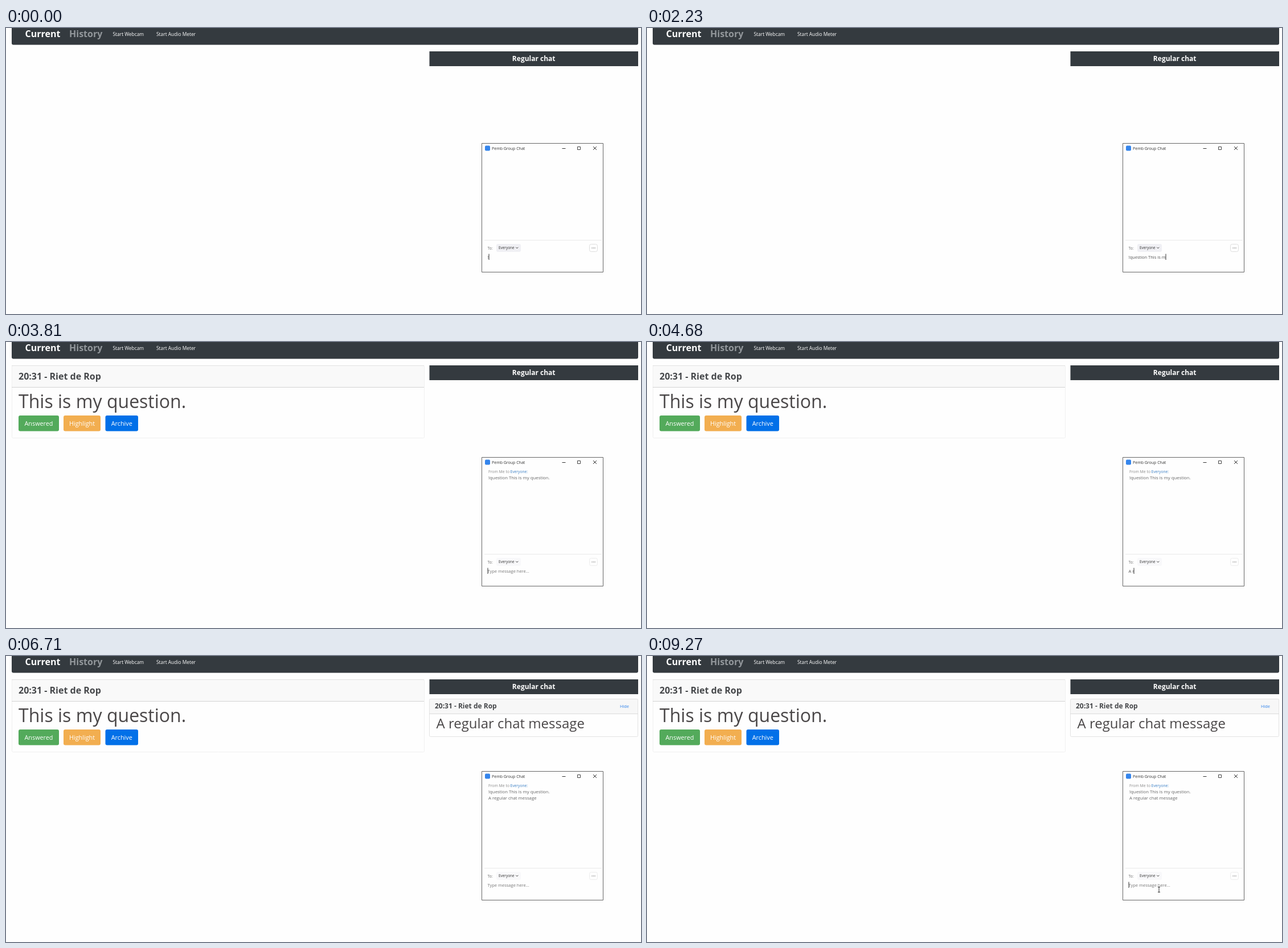
Recreate the animation shown at these times as an HTML page with a canvas. Size 1115 px wide and 502 px high, loop 9350 ms.

```html
<!DOCTYPE html>
<html lang="en">
<head>
<meta charset="utf-8">
<title>Question board</title>
<style>
html, body { margin: 0; width: 100%; height: 100%; overflow: hidden; background: #fefefe; }
canvas { display: block; width: 1115px; height: 502px; }
</style>
</head>
<body>
<canvas id="stage"></canvas>
<script>
const W = 1115, H = 502, LOOP = 9350;
const canvas = document.getElementById('stage');
const ctx = canvas.getContext('2d');
const ratio = window.devicePixelRatio || 1;
canvas.width = W * ratio;
canvas.height = H * ratio;

const DARK = '#343a3f';
const ASKER = '20:31 - Riet de Rop';
const QUESTION = 'This is my question.';
const COMMAND = '!question ' + QUESTION;
const CHAT = 'A regular chat message';

// Typing bursts: start, end, characters before, characters after
const COMMAND_KEYS = [[80, 1040, 1, 10], [1490, 2230, 10, 19], [2450, 2530, 19, 21], [2600, 2970, 21, 29], [3270, 3270, 29, 30]];
const CHAT_KEYS = [[4250, 4250, 0, 1], [4480, 4680, 1, 3], [4750, 5190, 3, 9], [5340, 6130, 9, 22]];

const SENT = 3730, ASKED = 3810, CHAT_SENT = 6190, CHAT_SHOWN = 6260;
const CARET_OFF = [[6710, 7220], [7730, 8160], [8670, 9200]];
const POINTER = 9270;

function box(x, y, w, h, fill, radius = 0) {
  ctx.fillStyle = fill;
  ctx.beginPath();
  ctx.roundRect(x, y, w, h, radius);
  ctx.fill();
}

function frame(x, y, w, h, color, radius = 0) {
  ctx.strokeStyle = color;
  ctx.lineWidth = 1;
  ctx.beginPath();
  ctx.roundRect(x + 0.5, y + 0.5, w - 1, h - 1, radius);
  ctx.stroke();
}

function lines(color, width, ...paths) {
  ctx.strokeStyle = color;
  ctx.lineWidth = width;
  ctx.beginPath();
  for (const [x, y, ...rest] of paths) {
    ctx.moveTo(x, y);
    for (let i = 0; i < rest.length; i += 2) ctx.lineTo(rest[i], rest[i + 1]);
  }
  ctx.stroke();
}

function text(str, x, y, size, color, weight = 400, align = 'left') {
  ctx.font = `${weight} ${size}px "Open Sans", "Noto Sans", sans-serif`;
  ctx.textAlign = align;
  ctx.fillStyle = color;
  ctx.fillText(str, x, y);
  return ctx.measureText(str).width;
}

function typedCount(keys, t, first) {
  let count = first;
  for (const [start, end, from, to] of keys) {
    if (t < start) break;
    const steps = to - from;
    const gap = steps > 1 ? (end - start) / (steps - 1) : 1;
    count = from + Math.min(steps, 1 + Math.floor((t - start) / gap + 1e-6));
  }
  return count;
}

function drawHeader() {
  box(10, -10, 1100, 39.5, DARK, 3);
  text('Current', 33.5, 16, 16, '#fff', 700);
  text('History', 111, 16, 16, '#92979b', 700);
  text('Start Webcam', 187.5, 14, 8.4, '#fff');
  text('Start Audio Meter', 264, 14, 8.4, '#fff');
  box(743.5, 41, 366.5, 26, DARK);
  text('Regular chat', 926.7, 58, 12, '#fff', 700, 'center');
}

function drawButton(label, x, w, color) {
  box(x, 129, w, 27.5, color, 3);
  text(label, x + w / 2, 147, 10.8, '#fff', 400, 'center');
}

function drawQuestion() {
  box(10, 41, 725, 38, '#f9f9f9');
  frame(10, 41, 725, 128, '#f0f0f0', 2);
  lines('#e2e2e2', 1, [10, 41.5, 734, 41.5]);
  lines('#d2d2d2', 1, [10, 79.5, 734, 79.5]);
  text(ASKER, 22, 66, 16, '#45474a', 700);
  text(QUESTION, 22, 116, 32, '#4a4748');
  drawButton('Answered', 22, 71, '#53aa5b');
  drawButton('Highlight', 101, 65, '#f2ae50');
  drawButton('Archive', 174.5, 57.5, '#0270e8');
}

function drawChatCard() {
  box(743, 75, 367, 26, '#f7f7f7');
  frame(743, 75, 367, 67, '#e3e3e3', 2);
  lines('#dcdcdc', 1, [743, 101.5, 1110, 101.5]);
  text(ASKER, 753, 91.5, 12, '#45474a', 700);
  text('Hide', 1078, 91, 7.4, '#2f82ea');
  text(CHAT, 755.5, 127, 24, '#4a4748');
}

function drawInput(t) {
  let str = '';
  if (t < SENT) str = COMMAND.slice(0, typedCount(COMMAND_KEYS, t, 1));
  else if (t < CHAT_SENT) str = CHAT.slice(0, typedCount(CHAT_KEYS, t, 0));
  const width = str
    ? text(str, 845.5, 405, 7.5, '#555')
    : (text('Type message here...', 845.5, 405, 7.5, '#777'), 0);
  const hidden = CARET_OFF.some(([from, to]) => t >= from && t < to);
  if (!hidden) box(Math.round(845.5 + width) - 0.5, 396.5, 1, 10.5, '#333');
}

function drawWindow(t) {
  box(835, 202, 214, 227, '#fefefe');
  frame(835, 202, 214, 227, '#666');
  box(841, 206.5, 9, 9, '#3585ec', 2);
  text('Pemb Group Chat', 853, 214, 7, '#333');
  lines('#333', 1, [976.5, 211.5, 982.5, 211.5], [1031, 208, 1037, 214], [1037, 208, 1031, 214]);
  frame(1003, 208, 6, 6, '#444');

  if (t >= SENT) {
    text('From Me to', 847, 229.5, 6.9, '#8a8a8a');
    text('Everyone:', 885.5, 229.5, 6.7, '#3a7fc4');
    text(COMMAND, 847, 241, 7.8, '#666');
  }
  if (t >= CHAT_SENT) text(CHAT, 847, 252, 7.8, '#666');

  lines('#e9e9e9', 1, [840, 372.5, 1046, 372.5]);
  text('To:', 845.5, 388.5, 6.5, '#666');
  box(861, 379, 43, 14, t < ASKED ? '#f0f0f4' : '#f8f8fa', 3);
  text('Everyone', 865, 388.3, 6.4, '#333');
  lines('#333', 1, [895.3, 384.8, 897.3, 386.8, 899.3, 384.8]);
  frame(1024, 379, 15, 14, t < ASKED ? '#dedede' : '#ececec', 3);
  for (let i = 0; i < 3; i++) box(1028.5 + i * 2.5, 385.5, 1.2, 1.2, '#777');
  drawInput(t);
}

function drawPreview(t) {
  const shown = Math.min((t - 7600) / 200, (8160 - t) / 140, 1);
  if (shown <= 0) return;
  ctx.save();
  ctx.globalAlpha = shown;
  const shade = ctx.createLinearGradient(0, 488, 0, H);
  shade.addColorStop(0, '#fefefe');
  shade.addColorStop(1, '#f6f6f6');
  box(0, 488, W, 14, shade);
  box(982, 440, 140, 70, '#fbfbfb');
  frame(982, 440, 140, 70, '#777');
  lines('#999', 1, [982, 441.5, W, 441.5]);
  ctx.filter = 'blur(0.8px)';
  box(995, 445, 24, 2, '#d5d5d5');
  box(1038, 443, 17, 2, '#bbb');
  box(987, 450, 130, 4.5, '#858789');
  box(990, 451, 36, 2, '#a5a7a8');
  box(1077, 457, 40, 3, '#8d8f91');
  box(1078, 462, 17, 2, '#d5d5d5');
  box(1078, 465, 14, 1.5, '#e2e2e2');
  box(1090, 476, 10, 2, '#e2e2e2');
  box(1088, 481, 13, 5, '#ededed');
  ctx.restore();
}

function drawPointer() {
  lines('#333', 1, [897, 405.5, 901, 405.5], [899, 405.5, 899, 414.5], [897, 414.5, 901, 414.5]);
}

function render(t) {
  ctx.setTransform(ratio, 0, 0, ratio, 0, 0);
  box(0, 0, W, H, '#fefefe');
  drawHeader();
  if (t >= ASKED) drawQuestion();
  if (t >= CHAT_SHOWN) drawChatCard();
  drawWindow(t);
  drawPreview(t);
  if (t >= POINTER) drawPointer();
}

const begin = performance.now();
function tick() {
  render((performance.now() - begin) % LOOP);
  requestAnimationFrame(tick);
}
tick();
</script>
</body>
</html>
```
